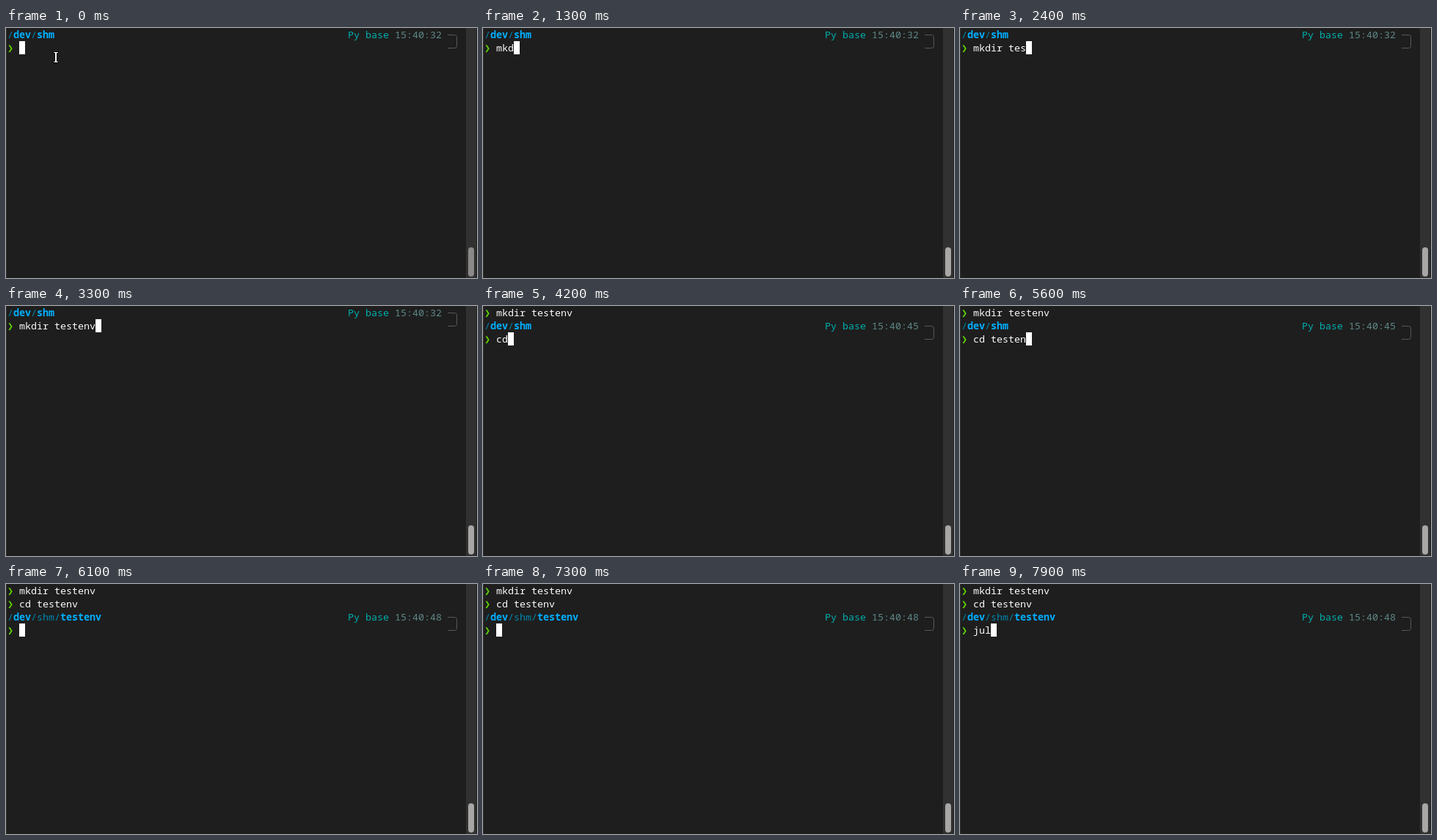
These frames come from a looping animation (642x342 px, 8000 ms). An HTML page with a canvas:

```html
<!DOCTYPE html>
<html lang="en">
<head>
<meta charset="utf-8">
<title>Terminal session</title>
<style>
  html, body { margin: 0; width: 100%; height: 100%; overflow: hidden; background: #1e1e1e; }
  canvas { display: block; }
</style>
</head>
<body>
<canvas id="stage" width="642" height="342"></canvas>
<script>
const ctx = document.getElementById('stage').getContext('2d');
const LOOP = 8000, CELL = 8, ROW = 18, LEFT = 2;
const MONO = '13.333px "Noto Sans Mono", monospace';
const CHEVRON = 'bold 13.333px "DejaVu Sans Mono", "DejaVu Sans", monospace';
const BLUE = '#00afff', DIM_BLUE = '#0087af';

// Each prompt: when it appears, its directory, and when each key is typed.
const prompts = [
  { start: 0, clock: '15:40:32', text: 'mkdir testenv',
    path: [['/'], ['dev', 1], ['/'], ['shm', 1]],
    keys: [900, 1100, 1300, 1400, 1600, 1700, 2000, 2200, 2400, 2600, 2900, 3200, 3300] },
  { start: 3600, clock: '15:40:45', text: 'cd testenv',
    path: [['/'], ['dev', 1], ['/'], ['shm', 1]],
    keys: [4000, 4200, 4400, 4800, 5000, 5100, 5300, 5400, 5600, 5700] },
  { start: 6100, clock: '15:40:48', text: 'jul',
    path: [['/'], ['dev', 1], ['/shm/'], ['testenv', 1]],
    keys: [7600, 7800, 7900] }
];
const blinks = [[500, 900], [6700, 7300]];

function rect(x, y, w, h, color) {
  ctx.fillStyle = color;
  ctx.fillRect(x, y, w, h);
}

function write(text, col, row, color, font = MONO) {
  ctx.font = font;
  ctx.fillStyle = color;
  ctx.fillText(text, LEFT + col * CELL, row * ROW + 14);
}

function commandLine(text, row) {
  write('❯', 0, row, '#5fd700', CHEVRON);
  write(text, 2, row, '#fcfcfc');
}

function statusLine({ path, clock }, row) {
  let col = 0;
  for (const [part, bold] of path) {
    write(part, col, row, bold ? BLUE : DIM_BLUE, (bold ? 'bold ' : '') + MONO);
    col += part.length;
  }
  write('Py base', 58, row, '#00afaf');
  write(clock, 66, row, '#5f8787');

  const y = row * ROW + 9.5;
  ctx.beginPath();
  ctx.moveTo(602, y);
  ctx.arcTo(614.5, y, 614.5, y + 9, 3);
  ctx.arcTo(614.5, y + ROW, 602, y + ROW, 3);
  ctx.lineTo(602, y + ROW);
  ctx.lineWidth = 1;
  ctx.strokeStyle = '#585858';
  ctx.stroke();
}

function mousePointer() {
  const bars = [[65, 33, 6, 1], [67, 33, 2, 14], [65, 46, 6, 1]];
  for (const [x, y, w, h] of bars) rect(x - 1, y - 1, w + 2, h + 2, '#000');
  for (const [x, y, w, h] of bars) rect(x, y, w, h, '#fff');
}

function scrollbar(t) {
  rect(627, 0, 14, 342, '#313131');
  ctx.fillStyle = t < 100 ? '#8b8a88' : '#a8a7a5';
  ctx.beginPath();
  ctx.roundRect(630, 300, 8, 40, 4);
  ctx.fill();
}

function draw(t) {
  rect(0, 0, 642, 342, '#1e1e1e');
  rect(0, 0, 1, 342, '#303030');
  scrollbar(t);

  const current = prompts.findLastIndex(p => p.start <= t);
  prompts.slice(0, current).forEach((p, row) => commandLine(p.text, row));

  const prompt = prompts[current];
  const typed = prompt.keys.filter(k => k <= t).length;
  statusLine(prompt, current);
  commandLine(prompt.text.slice(0, typed), current + 1);

  if (!blinks.some(([from, to]) => t >= from && t < to))
    rect(LEFT + (2 + typed) * CELL, (current + 1) * ROW, CELL, ROW, '#fff');
  if (t < prompts[0].keys[0]) mousePointer();
}

function tick() {
  draw(performance.now() % LOOP);
  requestAnimationFrame(tick);
}
tick();
</script>
</body>
</html>
```
